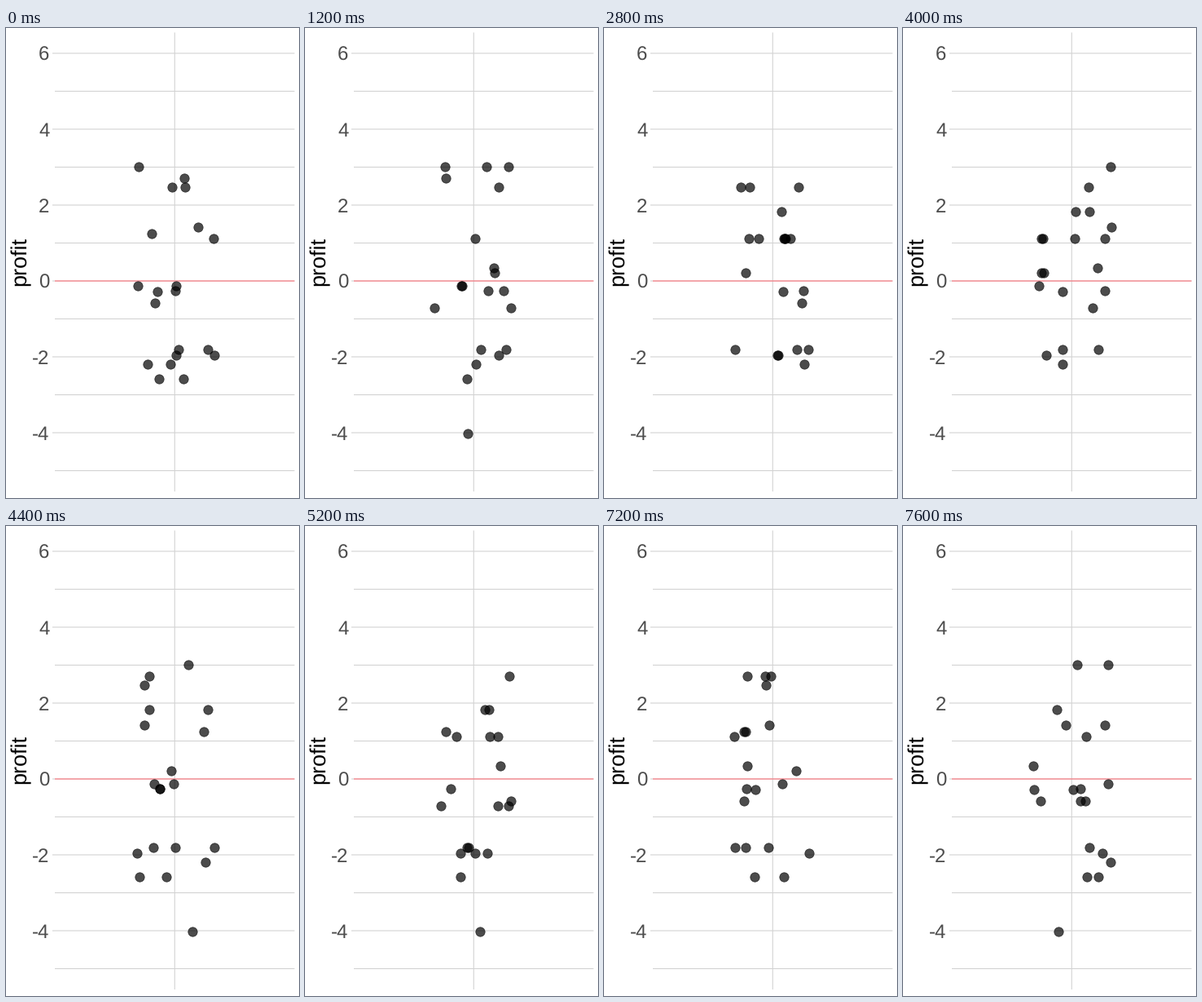
Write a matplotlib script that moves like this. It is 360 by 576 pixels and loops after 8000 ms.

```python
import numpy as np
import matplotlib.pyplot as plt
from matplotlib.animation import FuncAnimation

W, H = 360, 576
LEFT, RIGHT, TOP, BOTTOM = 60, 354.5, 5.5, 568
MID = (LEFT + RIGHT) / 2
ZERO, UNIT = 310, 46.5        # pixel row of profit 0, pixels per unit
SPREAD = 49                   # widest sideways jitter in pixels
STATES = 20

plt.rcParams["font.family"] = "Liberation Sans"
plt.rcParams["text.hinting"] = "none"

# The observed profits; every state shows a resample of them
PROFITS = np.array([3.01, 2.70, 2.48, 1.83, 1.41, 1.24, 1.11, 0.34, 0.21,
                    -0.12, -0.25, -0.26, -0.27, -0.58, -0.72, -1.80, -1.96,
                    -2.20, -2.57, -4.03])


def to_row(profit):
    return ZERO - UNIT * profit


def resample(rng):
    """Draw with replacement and jitter the draws around the middle."""
    profit = rng.choice(PROFITS, PROFITS.size)
    x = MID + rng.uniform(-SPREAD, SPREAD, PROFITS.size)
    return np.column_stack([x, to_row(profit)])


rng = np.random.default_rng(7)
swarms = [resample(rng) for _ in range(STATES)]

fig = plt.figure(figsize=(W / 72, H / 72), dpi=72, facecolor="white")
ax = fig.add_axes([0, 0, 1, 1])
ax.set(xlim=(0, W), ylim=(H, 0))
ax.axis("off")


def line(x, y, color="#d2d2d2"):
    ax.plot(x, y, color=color, lw=1.07, solid_capstyle="butt", snap=False,
            zorder=1)


for value in range(-5, 7):
    row = to_row(value)
    labelled = value % 2 == 0
    line([LEFT - 3 if labelled else LEFT, RIGHT], [row, row])
    if labelled:
        ax.text(53.6, row + 8.9, str(value), size=24, color="#4d4d4d",
                ha="right", va="baseline")
line([MID, MID], [TOP, BOTTOM])
line([LEFT, RIGHT], [ZERO, ZERO], "#ff6f78")

ax.text(25, 285.8, "profit", size=27, color="black", rotation=90,
        rotation_mode="anchor", ha="center", va="baseline")

dots = ax.scatter(*swarms[0].T, s=11.38 ** 2, color="black", alpha=0.7,
                  linewidths=0.71, zorder=2)
dots.set_snap(False)


def update(state):
    dots.set_offsets(swarms[state])
    return (dots,)


anim = FuncAnimation(fig, update, frames=STATES, interval=400, repeat=True,
                     repeat_delay=0)
plt.show()
```
